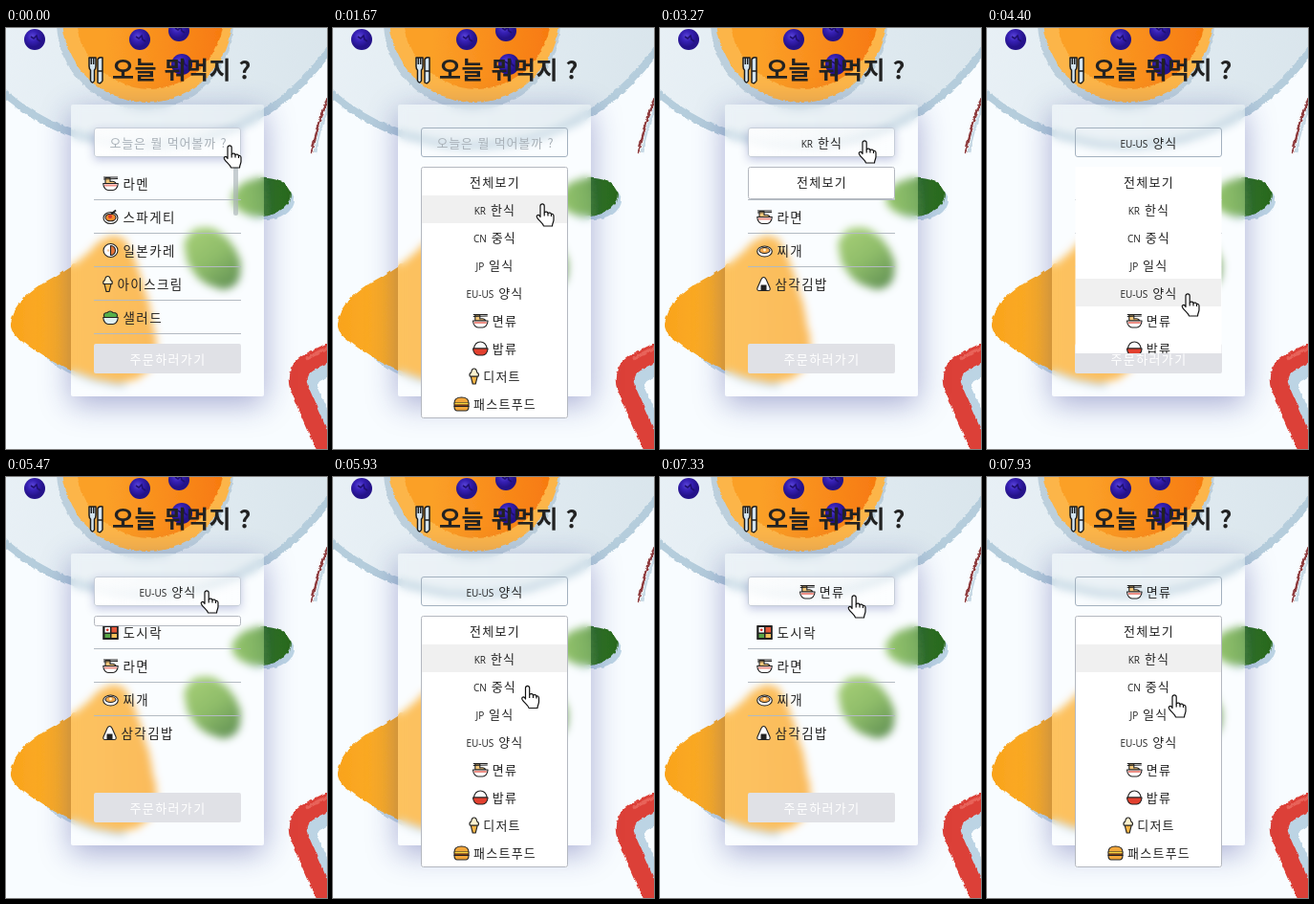
Animation of 336x440 px, one loop 8000 ms. Source, as an HTML page:

```html
<!DOCTYPE html>
<html lang="ko">
<head>
<meta charset="utf-8">
<title>오늘 뭐먹지 ?</title>
<style>
html, body { margin: 0; width: 100%; height: 100%; overflow: hidden; background: #f8fcff; }
svg, #card, #box { position: absolute; left: 0; top: 0; }
#card {
  left: 68px; top: 80px; width: 202px; height: 305px; border-radius: 2px;
  background: rgba(255, 255, 255, .25);
  backdrop-filter: blur(4px);
  box-shadow: 0 8px 32px rgba(31, 38, 135, .37);
}
#box {
  left: 92px; top: 104px; width: 152px; height: 29px; border-radius: 3px;
  border: 1px solid #a3b1bf; background: rgba(255, 255, 255, .1);
}
#box.hover {
  border-color: #c6cdd8; box-shadow: 0 3px 10px rgba(31, 38, 135, .25);
  background: linear-gradient(90deg, rgba(255, 255, 255, .85), rgba(255, 255, 255, .45));
}
text { font: 13px "Noto Sans CJK KR", "Noto Sans KR", sans-serif; letter-spacing: 1.25px; fill: #222; white-space: pre; }
.title { font-size: 25px; font-weight: 700; letter-spacing: .5px; }
.row { font-size: 13.5px; letter-spacing: 1.4px; }
.mid { text-anchor: middle; }
.code { font: 10px "Open Sans", sans-serif; letter-spacing: 0; }
.hint { fill: #a9b1b8; letter-spacing: .85px; }
.order { fill: #fff; letter-spacing: 1.4px; }
</style>
</head>
<body>
<svg width="336" height="440">
  <defs>
    <linearGradient id="plate"><stop stop-color="#ebf2f7"/><stop offset=".5" stop-color="#e2ecf2"/><stop offset="1" stop-color="#d8e4eb"/></linearGradient>
    <linearGradient id="lemon"><stop stop-color="#f9a31c"/><stop offset=".4" stop-color="#fcaf2b"/><stop offset="1" stop-color="#f9a426"/></linearGradient>
    <linearGradient id="orange"><stop offset=".2" stop-color="#fba028"/><stop offset="1" stop-color="#f77a10"/></linearGradient>
    <linearGradient id="leaf"><stop stop-color="#74b33c"/><stop offset=".45" stop-color="#54982f"/><stop offset=".65" stop-color="#2f741f"/><stop offset="1" stop-color="#2a6a1a"/></linearGradient>
    <linearGradient id="leaf2"><stop stop-color="#86bd48"/><stop offset=".5" stop-color="#69a637"/><stop offset="1" stop-color="#2f6e1d"/></linearGradient>
    <radialGradient id="berry" cx=".4" cy=".35"><stop stop-color="#5a45d8"/><stop offset=".5" stop-color="#3620b4"/><stop offset="1" stop-color="#24128a"/></radialGradient>
    <filter id="rough"><feTurbulence baseFrequency=".12" numOctaves="2" seed="4"/><feDisplacementMap in="SourceGraphic" scale="2" xChannelSelector="R" yChannelSelector="G"/></filter>
  </defs>
  <g filter="url(#rough)">
    <circle cx="147" cy="-108" r="231" fill="url(#plate)" stroke="#b5cddc" stroke-width="8"/>
    <circle cx="145" cy="-8" r="93" fill="#bccfdc"/>
    <circle cx="147" cy="-12" r="89" fill="#fcb548"/>
    <circle cx="150" cy="-14" r="77" fill="url(#orange)"/>
    <path d="M40 338Q70 366 125 373" stroke="#c3d9e7" stroke-width="8" fill="none"/>
    <path d="M4 308Q8 285 35 268Q70 250 92 228C104 215 120 212 127 226C140 252 154 300 157 328C160 356 140 369 118 370C80 368 40 345 18 328Q3 318 4 308Z" fill="url(#lemon)"/>
    <ellipse cx="271" cy="180" rx="30" ry="20" fill="#bdd5e5"/>
    <ellipse cx="267" cy="176" rx="31" ry="20" fill="url(#leaf)" transform="rotate(-6 267 176)"/>
    <ellipse cx="216" cy="240" rx="36" ry="25" fill="url(#leaf2)" transform="rotate(52 216 240)"/>
    <path d="M341 72Q328 102 323 130" stroke="#c8dae6" stroke-width="3" fill="none"/>
    <path d="M341 62Q326 96 319 130" stroke="#8e3a3c" stroke-width="2.5" fill="none"/>
    <path d="M352 349L328 361Q315 366 320 380L348 440" stroke="#bcd4e4" stroke-width="14" fill="none"/>
    <path d="M352 332L320 347Q300 356 307 377L337 446" stroke="#dc4038" stroke-width="19" fill="none"/>
    <path d="M340 332L314 345" stroke="#e8645a" stroke-width="3"/>
  </g>
  <g id="berries"></g>
</svg>
<div id="card"></div>
<div id="box"></div>
<svg id="ui" width="336" height="440"></svg>
<script>
const $ = id => document.getElementById(id);
const ink = 'stroke="#222" stroke-width="1.1" stroke-linejoin="round"';
const shape = (d, fill) => `<path d="${d}" fill="${fill}" ${ink}/>`;
const oval = (rx, ry, fill, cy = 0) => `<ellipse cx="8.5" cy="${cy}" rx="${rx}" ry="${ry}" fill="${fill}" ${ink}/>`;
const dot = (x, y, r, fill) => `<circle cx="${x}" cy="${y}" r="${r}" fill="${fill}"/>`;
const bowl = fill => shape('M.7 0H16.3C16 5 13 7 11 7H6C4 7 1 5 .7 0Z', fill);

// name: [width, drawing around the vertical middle]
const icons = {
  ramen: [17, shape('M3 0V-6H8V-2Q13-3 14 0Z', '#f3c77a') + bowl('#fff') +
    '<path d="M2 2H15" stroke="#ee8f86" stroke-width="2"/><path d="M1-6.5H16M1-4.500L16-5" stroke="#222" stroke-width="1.2"/>'],
  pasta: [17, oval(7.5, 6, '#fff', 1) + oval(5.5, 3.8, '#f58a2c', .5) + dot(8, -.5, 2, '#d8372c') + '<path d="M9-3L14-7" stroke="#222" stroke-width="1.8"/>'],
  curry: [17, oval(7.5, 7, '#fff') + shape('M8.5-5A5 5 0 0 1 8.5 5Z', '#e5763a') + dot(6, 0, 1.2, '#f5c9a0')],
  cone: [11, shape('M2 0L4 8H7L9 0Z', '#f6b545') + shape('M1 0Q0-3 2.5-4Q3-8 5.5-8Q8-8 8.5-4Q11-3 10 0Z', '#fff3cf')],
  salad: [17, shape('M2 0Q0-5 5-5Q8-8 11-5Q17-5 15 0Z', '#56b04a') + bowl('#dff0f0')],
  bento: [17, shape('M.8-7H16.2V7H.8Z', '#222') + '<path d="M2.5-5.5H8V0H2.5Z" fill="#fff"/><path d="M9.5-5.5H15V0H9.5Z" fill="#e5583b"/><path d="M2.5 1.5H8V5.5H2.5Z" fill="#5aa847"/><path d="M9.5 1.5H15V5.5H9.5Z" fill="#f4c15a"/>' + dot(5.2, -2.7, 1.4, '#d8372c')],
  stew: [17, oval(7.8, 5.5, '#fff', 1) + oval(5.5, 3, '#f6a94c', 0) + dot(8.5, -.5, 1.4, '#fff2d0')],
  gimbap: [15, shape('M7.5-7Q9-7 10 -5L14 4Q15 7 12 7H3Q0 7 1 4L5-5Q6-7 7.5-7Z', '#fff') + '<path d="M4.5 1H10.5V7H4.5Z" fill="#222"/>'],
  rice: [17, shape('M1.5 0Q3-7 8.5-7Q14-7 15.5 0Z', '#fff') + bowl('#e2402f')],
  burger: [17, shape('M1-1Q1-7 8.5-7Q16-7 16-1Z', '#f3a73b') + shape('M1-1H16V2.5H1Z', '#7a3d1c') + '<path d="M1.5-.5H15.5" stroke="#f8d63f" stroke-width="1.6"/>' + shape('M1 2.5H16Q16 7 13 7H4Q1 7 1 2.5Z', '#f3a73b')]
};
const icon = (name, x, y) => `<g transform="translate(${x} ${y})">${icons[name][1]}</g>`;
const text = (cls, x, y, s) => `<text class="${cls}" x="${x}" y="${y}">${s}</text>`;

const menu = [['전체보기'], ['한식', 'KR'], ['중식', 'CN'], ['일식', 'JP'], ['양식', 'EU-US'],
  ['면류', 'ramen'], ['밥류', 'rice'], ['디저트', 'cone'], ['패스트푸드', 'burger']];
const allFood = [['라멘', 'ramen'], ['스파게티', 'pasta'], ['일본카레', 'curry'], ['아이스크림', 'cone'], ['샐러드', 'salad']];
const koreanFood = [['도시락', 'bento'], ['라면', 'ramen'], ['찌개', 'stew'], ['삼각김밥', 'gimbap']];

function label([name, tag], cy) {
  if (!icons[tag]) {
    const code = tag ? `<tspan class="code">${tag}</tspan> ` : '';
    return text('mid', 169.5, cy + 5, code + name);
  }
  const w = icons[tag][0] + 4;
  const x = 169.5 - (w + name.length * 13.2) / 2;
  return icon(tag, x, cy) + text('', x + w, cy + 5, name);
}

const foodList = (list, lines) => list.map(([name, tag], i) => {
  const y = 162.5 + 35 * i;
  return icon(tag, 101, y) + text('row', 105.5 + icons[tag][0], y + 5, name) +
    (i < lines ? `<path d="M92 ${y + 17}H246" stroke="#b3bac2"/>` : '');
}).join('');

$('berries').innerHTML = [[30, 12], [140, 12], [181, 3], [184, 38]].map(([x, y]) =>
  dot(x, y, 11, 'url(#berry)') + `<path d="M${x - 4} ${y - 3}l3 2l3-3l1 4l3 2" stroke="#1f0f70" stroke-width="1.6" fill="none"/>`).join('');

$('ui').innerHTML = `
  <clipPath id="clip"><rect id="clipRect" x="92" y="145" width="154"/></clipPath>
  <g stroke="#1c1c1c" stroke-width="1.5" fill="#d3e4f0" stroke-linejoin="round">
    <path d="M87 31H94V40Q94 43 92.500 44V55Q90.500 59 88.500 55V44Q87 43 87 40ZM89.300 31V38M91.700 31V38"/>
    <path d="M96 57V33Q97 30 101 31V55Q99 59 96 57ZM96 45H101"/>
  </g>
  ${text('title', 111, 53, '오늘 뭐먹지 ?')}
  <g id="choice"></g>
  <g id="all">${foodList(allFood, 5)}<rect x="238" y="145" width="5" height="51" rx="2.5" fill="#aab4b8" opacity=".65"/></g>
  <g id="korean">${foodList(koreanFood, 3)}</g>
  <rect x="92" y="330" width="154" height="31" rx="2" fill="#e0e1e6"/>
  ${text('mid order', 169.5, 351, '주문하러가기')}
  <g clip-path="url(#clip)">
    <rect x="92.5" y="145" width="153" height="263" fill="#fff"/>
    <rect id="mark" x="93" width="152" height="29" fill="#f0f0f0"/>
    ${menu.map((m, i) => label(m, 161 + 29 * i)).join('')}
  </g>
  <rect id="frame" x="92.5" y="145.5" width="153" rx="2" fill="none" stroke="#b4b8c0"/>
  <g id="cursor" fill="#fff" stroke="#111" stroke-width="1.2" stroke-linejoin="round">
    <g id="hand">
      <path d="M-2 2a2.100 2.100 0 0 1 4.200 0v7c1-1.300 3.500-1 3.800.6c1-1 3.200-.6 3.500 1c1.200-.6 2.500 0 2.500 2v4c0 2-1.500 3.500-1.500 6.400h-9c-.6-3-5-5.500-7-9c-1-2 1.200-3.400 2.500-2l1 1.500z"/>
      <path d="M2.200 9v3.500M6 9.600v3M9.500 10.600v2.500" fill="none"/>
    </g>
    <path id="arrow" d="M0 0V17L4 13.300 6.800 19.500 9.500 18.400 6.800 12.300H12Z"/>
  </g>`;

// The screen refreshes 15 times a second; all times below are in these ticks.
const TICK = 1000 / 15, LOOP = 120, FULL = 263;
const moves = [[20, 25, 219, 184], [41, 46, 214, 118], [51, 62, 210, 278], [70, 75, 210, 119],
  [84, 94, 197, 318], [102, 110, 203, 124], [117, 119, 196, 228]];
const toggles = [[13, 11], [30], [49, 34], [66], [82, 11], [97], [114, 11]]; // with a height: opens
const picks = [[97, 5], [66, 4], [30, 1]];

function pointer(k) {
  let x = 234, y = 123;
  for (const [a, b, tx, ty] of moves) {
    const u = Math.min(1, Math.max(0, (k - a) / (b - a))), e = u * u * (3 - 2 * u);
    x += (tx - x) * e;
    y += (ty - y) * e;
  }
  return [x, y];
}

function dropdown(k) {
  const last = toggles.filter(([t]) => t <= k).pop();
  if (!last) return [0, false];
  const [t, start] = last;
  return start ? [Math.min(FULL, start + 126 * (k - t)), true] : [Math.max(0, 195 - 76 * (k - t)), false];
}

const show = (id, on) => $(id).setAttribute('visibility', on ? 'visible' : 'hidden');
let drawn = -1;

function draw(k) {
  const [x, y] = pointer(k), [h, open] = dropdown(k);
  const pick = picks.find(([t]) => t <= k);
  $('choice').innerHTML = pick ? label(menu[pick[1]], 120) : text('mid hint', 170, 125, '오늘은 뭘 먹어볼까 ?');
  $('box').className = y < 136 ? 'hover' : '';
  show('all', k < 30);
  show('korean', k >= 30);
  $('clipRect').setAttribute('height', h);
  show('frame', open);
  $('frame').setAttribute('height', Math.max(0, h - 1));
  // the highlight trails the pointer by one tick
  const row = Math.floor((pointer(k - 1)[1] - 146) / 29);
  show('mark', row >= 0);
  $('mark').setAttribute('y', 146 + 29 * row);
  const hand = y < Math.max(285, 145 + h);
  show('hand', hand);
  show('arrow', !hand);
  $('cursor').setAttribute('transform', `translate(${x} ${y})`);
}

function loop() {
  const k = Math.floor((performance.now() + 3.5) / TICK) % LOOP;
  if (k !== drawn) draw(drawn = k);
  requestAnimationFrame(loop);
}
loop();
</script>
</body>
</html>
```
